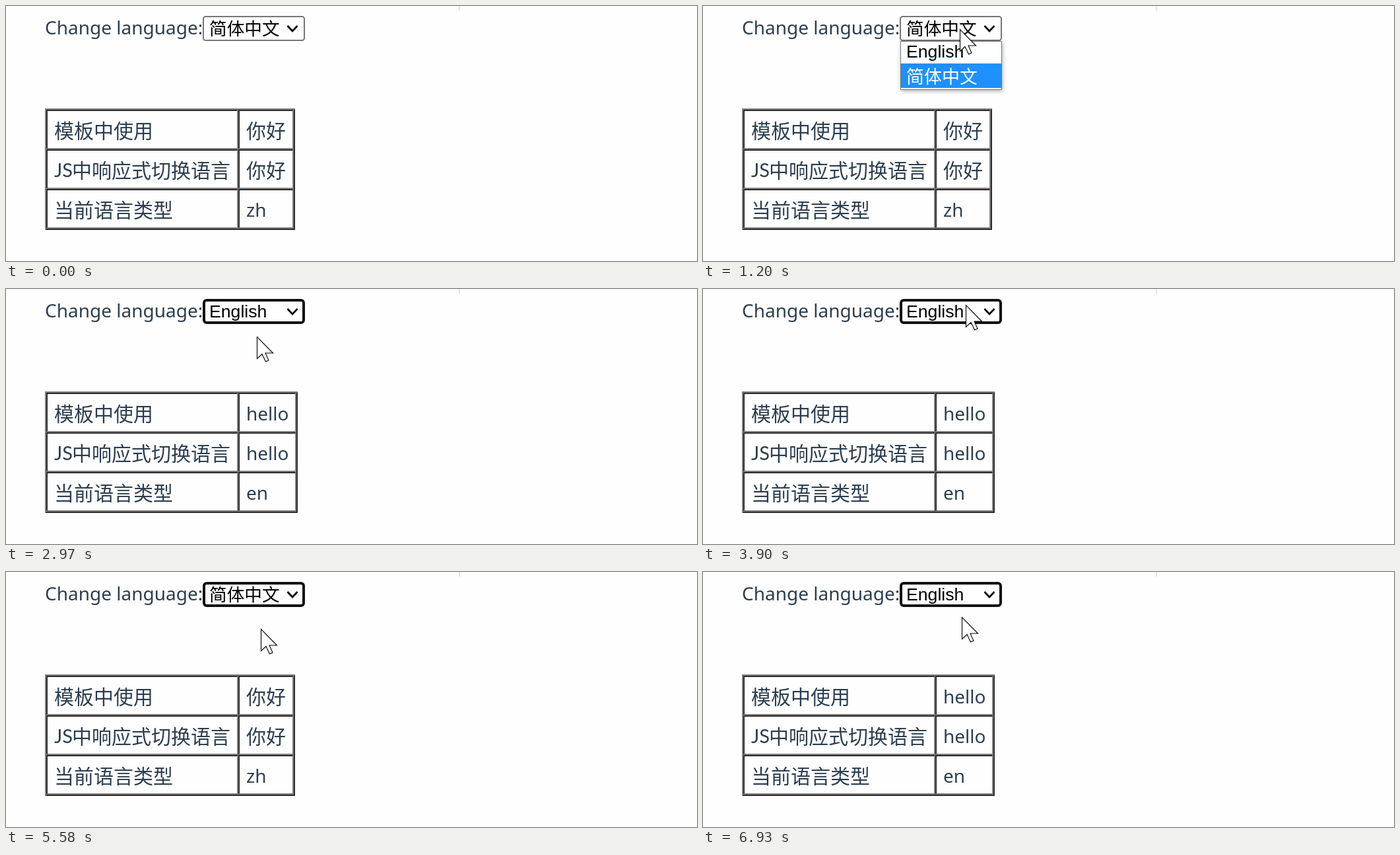
Animation, 1047 px wide and 386 px high, one loop 8 s. Source, as an HTML page:

```html
<!DOCTYPE html>
<html lang="zh-CN">
<head>
<meta charset="utf-8">
<title>Change language</title>
<style>
  html, body { margin: 0; width: 100%; height: 100%; overflow: hidden; background: #fefefe; }
  svg { display: block; width: 1047px; height: 386px; }
  text { font: 28px "Noto Sans", "Noto Sans CJK SC", "Noto Sans CJK", sans-serif; fill: #2c3e50; }
  text.cjk { font: 30px "Noto Sans CJK SC", "Noto Sans CJK", "Noto Sans", sans-serif; }
  text.js { font: 29px Lato, sans-serif; }
  text.ctl { font: 26.67px "Liberation Sans", "Noto Sans CJK SC", "Noto Sans CJK", sans-serif; fill: #000; }
  #popup { filter: drop-shadow(1px 2px 3px rgba(0, 0, 0, .3)); }
  .light { fill: #808080; }
  .dark { fill: #2c2c2c; }
</style>
</head>
<body>
<svg viewBox="0 0 1047 386">
  <rect x="686" width="2" height="7" fill="#e4e4e6"/>
  <text x="59" y="43">Change language:</text>

  <g id="table"></g>
  <text class="cjk" x="73" y="200">模板中使用</text>
  <text class="js" x="73" y="259">JS</text>
  <text class="cjk" x="100" y="260">中响应式切换语言</text>
  <text class="cjk" x="73" y="320">当前语言类型</text>
  <text id="v0" x="364"></text>
  <text id="v1" x="364"></text>
  <text id="v2" x="364" y="319"></text>

  <rect id="box" fill="#fff"/>
  <text id="choice" class="ctl" x="308"></text>
  <path d="M426.5 30l7.5 8l7.5-8" fill="none" stroke="#000" stroke-width="2.6"/>

  <g id="popup">
    <rect x="299.5" y="53.5" width="153" height="73" fill="#fff" stroke="#777"/>
    <rect id="mark" x="300" width="152" fill="#1e90ff"/>
    <text id="optEn" class="ctl" x="308" y="78">English</text>
    <text id="optZh" class="ctl" x="308" y="117" style="font-size:27px">简体中文</text>
  </g>

  <path id="cursor" d="M0 0V33L7.5 26L13 37.5L17.5 35.5L12.5 24.5H24Z"
        fill="#fff" stroke="#000" stroke-width="1.1"/>
</svg>
<script>
const LOOP = 8000, TICK = 30;
const $ = id => document.getElementById(id);
const set = (el, attrs) => { for (const k in attrs) el.setAttribute(k, attrs[k]); };

// Language and select state from each time on
const scenes = [
  [0, 'zh', 'idle'], [1200, 'zh', 'opening'], [1230, 'zh', 'open'],
  [2970, 'en', 'focus'], [4020, 'en', 'open'],
  [5070, 'zh', 'focus'], [6000, 'zh', 'open'],
  [6930, 'en', 'focus']
];

// Pointer tip on its way in, one point per tick
const ENTER = 390;
const entry = [
  [1042, 46], [1010, 40], [925, 24], [829, 13], [731, 12], [638, 10],
  [550, 9], [515, 11], [493, 12], [481, 14], [470, 16], [455, 20],
  [440, 25], [425, 28], [410, 31], [398, 33], [389, 35]
];

// Later moves: start, ticks, end point
const moves = [
  [1650, 12, 380, 72], [3570, 12, 398, 24], [4290, 13, 384, 101],
  [5520, 11, 392, 33], [6240, 9, 392, 68]
];

const words = {
  zh: { choice: '简体中文', hello: '你好', right: 436 },
  en: { choice: 'English', hello: 'hello', right: 440 }
};

const ease = p => (p + p * p * (3 - 2 * p)) / 2;

function pointer(t) {
  if (t < ENTER) return null;
  let [x, y] = entry[Math.min(entry.length - 1, Math.floor((t - ENTER) / TICK))];
  for (const [start, ticks, toX, toY] of moves) {
    if (t < start) break;
    const p = ease(Math.min(1, (Math.floor((t - start) / TICK) + 1) / ticks));
    x += (toX - x) * p;
    y += (toY - y) * p;
  }
  return [x, y];
}

// Two-tone 2px frame
function bevel(x, y, r, b, first, second) {
  const w = r - x, h = b - y;
  return `<path class="${second}" d="M${r} ${y}V${b}H${x}l2-2H${r - 2}V${y + 2}Z"/>` +
         `<path class="${first}" d="M${x} ${y}h${w}l-2 2H${x + 2}v${h - 4}l-2 2Z"/>`;
}

function drawTable(lang) {
  const { hello, right } = words[lang];
  let out = bevel(59, 155, right + 2, 339, 'light', 'dark');
  for (let y = 157; y < 337; y += 60)
    out += bevel(61, y, 352, y + 60, 'dark', 'light') +
           bevel(352, y, right, y + 60, 'dark', 'light');
  $('table').innerHTML = out;
  for (const i of [0, 1]) {
    const cell = $('v' + i);
    cell.textContent = hello;
    set(cell, { class: lang === 'zh' ? 'cjk' : '', y: 199 + 60 * i + (lang === 'zh') });
  }
  $('v2').textContent = lang;
  $('choice').textContent = words[lang].choice;
  set($('choice'), { y: lang === 'zh' ? 44 : 43 });
}

function drawBox(mode) {
  const focus = mode === 'focus', w = focus ? 4 : 2;
  set($('box'), {
    x: 298 + w / 2, y: 15 + w / 2, width: 155 - w, height: 38 - w, rx: focus ? 4 : 3.5,
    'stroke-width': w,
    stroke: focus ? '#101010' : mode === 'open' ? '#4f4a50' : '#767676'
  });
}

function drawPopup(lang, tip) {
  const hot = tip[1] < 53 ? lang : tip[1] < 87 ? 'en' : 'zh';
  set($('mark'), hot === 'en' ? { y: 53, height: 34 } : { y: 87, height: 37 });
  $('optEn').style.fill = hot === 'en' ? '#fff' : '#000';
  $('optZh').style.fill = hot === 'zh' ? '#fff' : '#000';
}

let shown = '';
function draw(now) {
  const t = now % LOOP;
  const [, lang, mode] = scenes.filter(s => s[0] <= t).pop();
  const tip = pointer(t), open = mode.startsWith('open');
  if (shown !== lang) drawTable(shown = lang);
  drawBox(mode);
  $('popup').style.display = open ? '' : 'none';
  if (open) drawPopup(lang, tip);
  $('cursor').style.display = tip ? '' : 'none';
  if (tip) {
    const [x, y] = tip.map(Math.round);
    set($('cursor'), { transform: `translate(${x + .5} ${y + .5})` });
  }
}

let origin;
function frame(now) {
  origin ??= now;
  draw(now - origin);
  requestAnimationFrame(frame);
}
draw(0);
requestAnimationFrame(frame);
</script>
</body>
</html>
```
